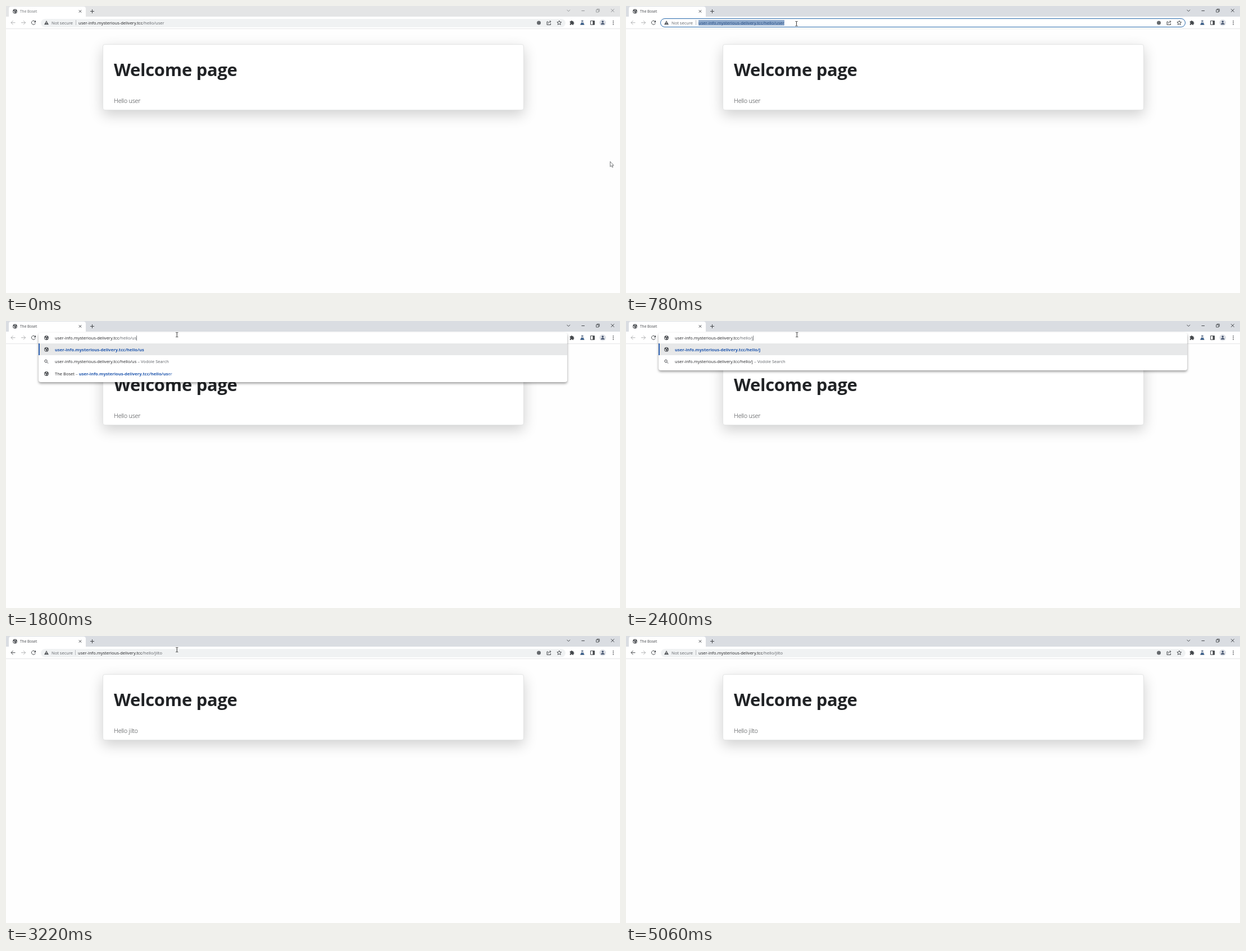
An HTML page for the animation above (5080 ms loop, 1093 px wide and 512 px high).

```html
<!DOCTYPE html>
<html lang="en">
<head>
<meta charset="utf-8">
<title>Welcome page</title>
<style>
html, body { margin: 0; width: 100%; height: 100%; overflow: hidden; background: #fefefe; }
#stage { position: relative; width: 1093px; height: 512px; overflow: hidden; font: 7.55px/12px "Open Sans", "Noto Sans", sans-serif; color: #202124; }
#stage div, #stage svg { position: absolute; box-sizing: border-box; }
.t { white-space: pre; }
svg { left: 0; top: 0; width: 1093px; height: 512px; overflow: visible; }
.line { fill: none; stroke: #45484c; stroke-width: 1; }
.dark { fill: #45484c; }

#card { left: 171.5px; top: 67.5px; width: 750px; height: 118px; background: #fff; border: 1px solid #e3e4e4; border-radius: 4px; box-shadow: 0 8px 25px rgba(0,0,0,.19); }
#head { left: 192px; top: 92px; font-size: 31px; line-height: 42px; font-weight: 700; letter-spacing: -.3px; color: #212326; }
#greet { left: 192px; top: 160.5px; font-size: 11px; line-height: 16px; font-weight: 300; letter-spacing: -.28px; color: #35383b; }

#strip { left: 0; top: 0; width: 1093px; height: 20px; background: #dadde2; }
#tab { left: 5px; top: 1px; width: 137px; height: 19px; background: #fff; border-radius: 4px 4px 0 0; }
#tabText { left: 25px; top: 3.5px; font-size: 6.55px; color: #45484c; }
#bar { left: 0; top: 19px; width: 1093px; height: 22px; background: #fff; border-bottom: 1px solid #e6e7e8; }
#pill { left: 62px; top: 22.5px; width: 934px; height: 15px; background: #f0f2f3; border-radius: 8px; }
.focus #pill { left: 61px; top: 21.5px; width: 935px; height: 16.5px; background: #fff; border: 1.6px solid #2c6cad; }
#secure { left: 81px; top: 23.5px; color: #5f6368; }
#split { left: 123.5px; top: 25px; width: 1px; height: 9px; background: #b9bcc0; }
#url { left: 129px; top: 23.5px; }
.path { color: #5f6368; }
.picked { background: #8ca8cb; color: #23497f; }
.picked .path { color: #23497f; }
.caret { display: inline-block; width: .8px; height: 9px; background: #85888b; vertical-align: -2px; margin-right: -.8px; }

#popup { left: 58px; top: 21px; width: 941px; height: 88px; background: #fff; border-radius: 4px; box-shadow: 0 2.5px 4px rgba(0,0,0,.38); overflow: hidden; }
#hot { left: 0; top: 19px; width: 941px; height: 21px; background: #e7e8e9; border-left: 2px solid #2f62b3; }
#popup .t { left: 29px; }
#edit { top: 2.5px; }
#row1 { top: 23.5px; }
#row2 { top: 45px; }
#row3 { top: 66.5px; }
#popup svg { left: -58px; top: -21px; }
#popup b, .link { color: #1f56ad; }
#popup b { letter-spacing: .03px; }
.off #strip { background: #e4e5e6; }
.off #wins { opacity: .5; }
.off #tabText { color: #707376; }
.hide { display: none; }
</style>
</head>
<body>
<div id="stage">
  <div id="card"></div>
  <div id="head" class="t">Welcome page</div>
  <div id="greet" class="t"></div>

  <div id="strip"></div>
  <div id="tab"></div>
  <div id="bar"></div>
  <div id="tabText" class="t">The Boset</div>
  <div id="pill"></div>

  <svg>
    <defs>
      <symbol id="globe" viewBox="-5 -5 10 10">
        <circle r="3.9" fill="#4d5054"/>
        <path d="M-3 -.8 L-.8 .5 L-.5 2.9 C-2 2.7 -3.1 1 -3 -.8Z M-.4 -2.9 L1.4 -2.5 L.5 -1.2 L-.7 -.9Z M1.2 .4 L2.9 .3 L2.2 1.9 L1.3 1.4Z" fill="#fff"/>
      </symbol>
    </defs>
    <use href="#globe" x="11" y="4.5" width="10" height="10"/>
    <path class="line" d="M129.8 7.3l4.4 4.4m0-4.4l-4.4 4.4M150 9.5h7M153.5 6v7"/>
    <g id="wins" class="line">
      <path d="M998.5 6.8l2.8 2.8 2.8-2.8M1024.5 8.5h5.5M1077 5.3l5.6 5.6m0-5.6l-5.6 5.6"/>
      <path d="M1050.7 6.8h4.2v4.2h-4.2zM1052 6.5V5.4h4.3v4.2h-1.2" stroke-width=".9"/>
    </g>
    <path id="back" class="line" d="M16.5 29.7H9M12.5 26.2L9 29.7l3.5 3.5"/>
    <path class="line" d="M27 29.7h7.5M31 26.2l3.5 3.5-3.5 3.5" opacity=".4"/>
    <path class="line" d="M51.6 27.3A3.5 3.5 0 1 0 52.3 30.8" stroke-width="1.2"/>
    <path class="dark" d="M53 25.6v3.6h-3.6z"/>
    <g id="tools">
      <path d="M72 26l4 7.2h-8z" fill="#505357"/>
      <path d="M72 28.4v2.3M72 31.4v.9" stroke="#fff" stroke-width=".9"/>
      <circle cx="948.5" cy="30" r="3.5" fill="#65696d"/>
      <path class="line" d="M965 28h-2v5.5h6.5V31M965 31.5c.2-2.4 1.6-3.6 4.5-3.6M968 25.9l2 2-2 2" stroke-width=".8"/>
      <path class="line" d="M984.8 26l1.1 2.6 2.8.2-2.1 1.9.6 2.7-2.4-1.5-2.4 1.5.6-2.7-2.1-1.9 2.8-.2z" stroke-width=".9"/>
    </g>
    <path class="dark" d="M1003.8 27.3h2a1.2 1.2 0 0 1 2.4 0h2v2a1.2 1.2 0 0 1 0 2.4v2h-2.1a1.1 1.1 0 0 0-2.2 0h-2.1v-2.1a1.1 1.1 0 0 0 0-2.2z"/>
    <path d="M1024.2 26h3.4M1025 26v2.8l-2.4 4.5h6.6l-2.4-4.5V26" fill="none" stroke="#4a5f7c" stroke-width=".9"/>
    <path d="M1024.4 30.3h3l1.5 2.8h-6z" fill="#2c5688"/>
    <path class="line" d="M1040.5 26.5h7v6.8h-7z"/>
    <path class="dark" d="M1044.5 26.5h3v6.8h-3z"/>
    <circle cx="1062.2" cy="29.8" r="5.8" fill="#dcdfe5"/>
    <circle cx="1062.2" cy="28" r="1.7" fill="#41506b"/>
    <path d="M1058.9 33c0-3.6 6.6-3.6 6.6 0z" fill="#41506b"/>
    <g class="dark"><circle cx="1081" cy="26.8" r=".9"/><circle cx="1081" cy="29.8" r=".9"/><circle cx="1081" cy="32.8" r=".9"/></g>
  </svg>

  <div id="secure" class="t">Not secure</div>
  <div id="split"></div>
  <div id="url" class="t"></div>

  <div id="popup">
    <div id="hot"></div>
    <svg>
      <use href="#globe" x="67" y="25" width="10" height="10"/>
      <use href="#globe" x="67" y="45.7" width="10" height="10"/>
      <g class="line"><circle cx="71" cy="71.5" r="2.2"/><path d="M72.7 73.2l2.5 2.5"/></g>
      <use href="#globe" x="67" y="89" width="10" height="10"/>
    </svg>
    <div id="edit" class="t"></div>
    <div id="row1" class="t"></div>
    <div id="row2" class="t"></div>
    <div id="row3" class="t"></div>
  </div>

  <svg>
    <path id="arrow" d="M0 0V9.2L2.1 7.3 3.6 10.4 5 9.8 3.6 6.8H6.3z" fill="#fff" stroke="#55585b" stroke-width=".8"/>
    <path id="beam" d="M-2-4H-.5L0-3.5.5-4H2M0-3.5V3.5M-2 4H-.5L0 3.5.5 4H2" fill="none" stroke="#222" stroke-width=".9"/>
  </svg>
</div>
<script>
const LOOP = 5080;
const HOST = 'user-info.mysterious-delivery.tcc';
const OLD = 'user', NEW = 'jilto';
const CLICK = 620, PLACE = 1080, TYPE = 1540, ENTER = 3040, LOADED = 3140, SETTLED = 3250, GONE = 4500;

// [time, text after /hello/]
const KEYS = [[1540, 'use'], [1700, 'us'], [1880, 'u'], [2040, ''],
  ...[2340, 2480, 2600, 2740, 2880].map((ms, i) => [ms, NEW.slice(0, i + 1)])];

// [time, x, y]
const MOVES = [[0, 1075.5, 277.5], [80, 1075.5, 277.5], [540, 303.5, 31.5], [1100, 303.5, 31.5],
  [1500, 304.3, 24.5], [3880, 304.3, 24.5], [4160, 540.3, 50.5], [LOOP, 540.3, 50.5]];

const $ = id => document.getElementById(id);
const stage = $('stage');
const show = (id, on) => $(id).classList.toggle('hide', !on);
const fill = (id, html) => { if ($(id).dataset.v !== html) $(id).innerHTML = $(id).dataset.v = html; };
const address = name => `${HOST}<span class="path">/hello/${name}</span>`;
const ease = k => k * k * (3 - 2 * k);
const CARET = '<span class="caret"></span>';

function pointer(t) {
  const i = MOVES.findIndex(m => m[0] > t);
  const [t0, x0, y0] = MOVES[i - 1], [t1, x1, y1] = MOVES[i];
  const k = ease((t - t0) / (t1 - t0));
  return [x0 + (x1 - x0) * k, y0 + (y1 - y0) * k];
}

function drawPopup(t) {
  const typed = KEYS.filter(k => k[0] <= t).pop()[1];
  const full = `${HOST}/hello/${typed}`;
  const known = OLD.startsWith(typed);
  fill('edit', address(typed) + CARET);
  fill('row1', `<b>${full}</b>`);
  fill('row2', `${full}<span class="path"> – Vodole Search</span>`);
  fill('row3', known ? `The Boset<span class="path"> – </span><b>${full}</b><span class="link">${OLD.slice(typed.length)}</span>` : '');
  $('popup').style.height = (known ? 88 : 66.5) + 'px';
}

function draw(t) {
  const typing = t >= TYPE && t < ENTER;
  const picked = t >= CLICK && t < PLACE;
  const placed = t >= PLACE && t < TYPE;
  const loaded = t >= LOADED;
  stage.classList.toggle('off', t < CLICK);
  stage.classList.toggle('focus', picked || placed);
  fill('greet', 'Hello ' + (loaded ? NEW : OLD));
  $('back').style.opacity = loaded ? 1 : .4;

  const line = address(t < ENTER ? OLD : NEW);
  fill('url', picked ? `<span class="picked">${line}</span>` : line + (placed ? CARET : ''));
  const shift = t >= ENTER && t < SETTLED ? -1 : 0;
  $('url').style.left = 129 + shift + 'px';
  $('split').style.left = 123.5 + shift + 'px';
  for (const id of ['url', 'secure', 'split', 'tools', 'pill']) show(id, !typing);
  show('popup', typing);
  if (typing) drawPopup(t);

  const [x, y] = pointer(t);
  const overText = y > 22 && y < 38 && x > 62 && x < 940;
  show('beam', overText && t < GONE);
  show('arrow', !overText && t < GONE);
  $(overText ? 'beam' : 'arrow').setAttribute('transform', `translate(${x} ${y})`);
}

const start = performance.now();
function tick() {
  draw((performance.now() - start) % LOOP);
  requestAnimationFrame(tick);
}
tick();
</script>
</body>
</html>
```
